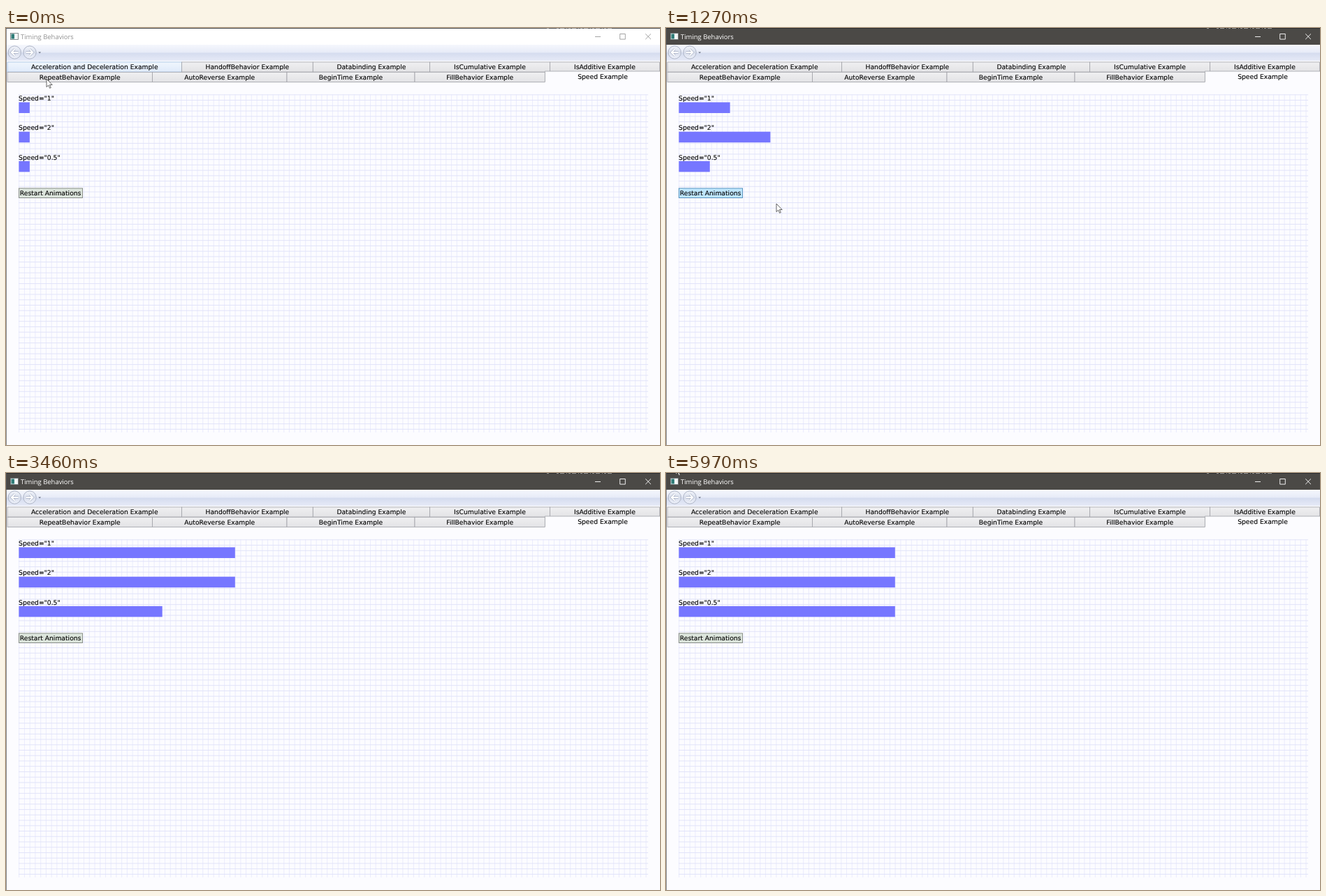
These frames come from a looping animation (936 px wide and 598 px high, 6.17 s). An HTML page:

```html
<!DOCTYPE html>
<html lang="en">
<head>
<meta charset="utf-8">
<title>Timing Behaviors</title>
<style>
html, body { margin: 0; width: 100%; height: 100%; overflow: hidden; background: #fcfcff; }
svg { display: block; width: 936px; height: 598px; }
text { font: 9.2px "DejaVu Sans", sans-serif; fill: #000; stroke: #000; stroke-width: .12px; text-rendering: geometricPrecision; }
#title text { font: 9.45px "Open Sans", sans-serif; stroke: none; }
.mid { text-anchor: middle; }
</style>
</head>
<body>
<svg id="stage" viewBox="0 0 936 598" xmlns="http://www.w3.org/2000/svg">
  <defs>
    <linearGradient id="bar" x1="0" y1="0" x2="0" y2="1">
      <stop offset="0" stop-color="#f5f7fd"/>
      <stop offset=".48" stop-color="#e7ebf7"/>
      <stop offset=".52" stop-color="#d5dcef"/>
      <stop offset="1" stop-color="#e6eaf7"/>
    </linearGradient>
    <linearGradient id="tab" x1="0" y1="0" x2="0" y2="1">
      <stop offset="0" stop-color="#f0f0f2"/>
      <stop offset=".5" stop-color="#e9e9eb"/>
      <stop offset="1" stop-color="#e3e3e6"/>
    </linearGradient>
    <linearGradient id="tabHot" x1="0" y1="0" x2="0" y2="1">
      <stop offset="0" stop-color="#f0f6fd"/>
      <stop offset="1" stop-color="#dfeafa"/>
    </linearGradient>
    <linearGradient id="disc" x1="0" y1="0" x2="0" y2="1">
      <stop offset="0" stop-color="#f3f5fb"/>
      <stop offset=".5" stop-color="#d8deec"/>
      <stop offset="1" stop-color="#eef1fa"/>
    </linearGradient>
  </defs>
  <rect width="936" height="598" fill="#fcfcff"/>
  <g id="title">
    <rect id="caption" width="936" height="24"/>
    <rect x="6.5" y="7.5" width="11" height="9" fill="#f4f6f6" stroke="#6d7778" stroke-width=".8"/>
    <rect x="7.5" y="8.5" width="4.5" height="7" fill="#2f7d78"/>
    <text id="name" x="21" y="15.6">Timing Behaviors</text>
    <path id="controls" fill="none" stroke-width=".9" d="M843 12.5h8M878.7 8.5h7.6v7.6h-7.6zM915.2 8.4l7.8 7.8M923 8.4l-7.8 7.8"/>
  </g>
  <rect y="24" width="936" height="23" fill="url(#bar)"/>
  <g id="nav"></g>
  <path d="M46.3 34.6h3.8l-1.9 1.6z" fill="#5c6474"/>
  <g id="tabs"></g>
  <path id="columns" fill="none" stroke="#e6e7fb" stroke-width=".8"/>
  <path id="lines" fill="none" stroke="#dfe1f9" stroke-width=".9"/>
  <g id="rows"></g>
  <rect id="button" x="18.4" y="229.9" width="91.2" height="13.6" stroke-width=".8"/>
  <text x="19.8" y="240.3">Restart Animations</text>
  <path d="M0 .4H936" stroke="#24262a" stroke-width=".9"/>
  <path d="M774 .5h3M788 .5H868" stroke="#a9a9a9" stroke-width=".8" stroke-dasharray="3 2 6 3 1 2"/>
  <path d="M.4 0V598" stroke="#55575c" stroke-width=".8"/>
  <path id="cursor" d="M0 0V11.6L2.7 9.1L4.6 13.3L6.3 12.5L4.5 8.5H8.2Z" fill="#fff" stroke="#333" stroke-width=".75"/>
</svg>
<script>
const LOOP = 6170, START = 877;
const UNIT = 936 / 1210; // the window is drawn at this scale
const SVG = "http://www.w3.org/2000/svg";
const $ = id => document.getElementById(id);

function set(node, attrs) {
  for (const key in attrs) node.setAttribute(key, attrs[key]);
}
function add(parent, tag, attrs, label) {
  const node = document.createElementNS(SVG, tag);
  set(node, attrs);
  if (label) node.textContent = label;
  return parent.appendChild(node);
}

// Back and forward buttons
const arrow = "M5.4 0H-4M.2 -4.6L-4.4 0L.2 4.6";
for (const [x, dir] of [[12.3, 1], [34, -1]]) {
  const g = add($("nav"), "g", { transform: `translate(${x} 35) scale(${dir} 1)` });
  add(g, "circle", { r: 9.2, fill: "url(#disc)", stroke: "#adb4c6", "stroke-width": 1 });
  add(g, "path", { d: arrow, fill: "none", stroke: "#abb3c6", "stroke-width": 3.3 });
  add(g, "path", { d: arrow, fill: "none", stroke: "#fff", "stroke-width": 2 });
}

// Tabs: each row lists its edges
const plainTab = { fill: "url(#tab)", stroke: "#a0a1a7" };
function tabRow(y, edges, names) {
  return names.map((name, i) => {
    const x = edges[i], width = edges[i + 1] - x;
    const box = add($("tabs"), "rect", { x, y, width, height: 14.2, "stroke-width": 0.8, ...plainTab });
    add($("tabs"), "text", { x: x + width / 2, y: y + 10.4, class: "mid" }, name + " Example");
    return box;
  });
}
const hotTab = tabRow(48.9, [2, 251.5, 439.3, 606.5, 778.4, 935.4],
  ["Acceleration and Deceleration", "HandoffBehavior", "Databinding", "IsCumulative", "IsAdditive"])[0];
tabRow(63.3, [2, 209.5, 402, 585, 771.4],
  ["RepeatBehavior", "AutoReverse", "BeginTime", "FillBehavior"]);
add($("tabs"), "path", { d: "M771.4 79V62H936V79Z", fill: "#fcfcff" });
add($("tabs"), "path", { d: "M771.4 77.5V62H936", fill: "none", stroke: plainTab.stroke, "stroke-width": 0.8 });
add($("tabs"), "text", { x: 854, y: 72.8, class: "mid" }, "Speed Example");

// Background grid
const pitch = 10 * UNIT;
let across = "", down = "";
for (let y = 95.8; y < 580; y += pitch) across += `M18 ${y}H919`;
for (let x = 18.7; x < 919; x += pitch) down += `M${x} 95.4V580`;
set($("lines"), { d: across });
set($("columns"), { d: down });

const bars = [1, 2, 0.5].map((speed, i) => {
  const y = 106.5 + i * 42.2;
  add($("rows"), "text", { x: 18.1, y: y - 2.3 }, `Speed="${speed}"`);
  return { speed, node: add($("rows"), "rect", { x: 18.4, y, height: 20 * UNIT, fill: "#7676ff" }) };
});

// Moments at which the screen refreshes
const ticks = [0, 110, 300, 490, 680, 880, 1080, 1270, 1460, 1660, 1860, 2080, 2280,
  2470, 2670, 2870, 3070, 3270, 3460, 3660, 3850, 4050, 4240, 4430, 4630, 4830, 5020, 5800, 5970];

// Pointer stops: time, x, y
const trips = [
  [[0, 58, 73], [300, 58, 180], [490, 58.5, 226], [680, 58.5, 233], [880, 58.5, 233],
    [1080, 90, 241], [1270, 158, 252], [1460, 882, 60]],
  [[5800, 689, 44], [5970, 14, -9.5]]
];

function pointer(t) {
  for (const trip of trips) {
    const last = trip[trip.length - 1];
    if (t < trip[0][0] || t > last[0]) continue;
    const i = trip.findIndex(p => p[0] >= t);
    const b = trip[i], a = trip[Math.max(0, i - 1)];
    const k = b === a ? 0 : (t - a[0]) / (b[0] - a[0]);
    return [a[1] + (b[1] - a[1]) * k, a[2] + (b[2] - a[2]) * k];
  }
  return null;
}

function draw(time) {
  const now = time % LOOP;
  const t = ticks.filter(tick => tick <= now).pop() || 0;
  const active = t >= 880;
  const hover = t >= 490 && t < 1460;

  for (const { speed, node } of bars) {
    const k = Math.min(1, Math.max(0, (t - START) * speed / 2000));
    set(node, { width: (20 + 380 * k) * UNIT });
  }
  set($("caption"), { fill: active ? "#4b4946" : "#fff" });
  $("name").style.fill = active ? "#fff" : "#929292";
  set($("controls"), { stroke: active ? "#fff" : "#999" });
  set($("button"), hover ? { fill: "#bee6fd", stroke: "#3c7fb1" } : { fill: "#dce5dc", stroke: "#737873" });
  set(hotTab, t < 110 ? { fill: "url(#tabHot)", stroke: "#9fbfe0" } : plainTab);

  const at = pointer(t);
  $("cursor").style.display = at ? "" : "none";
  if (at) set($("cursor"), { transform: `translate(${at[0]} ${at[1]})` });
}

const begun = performance.now();
function loop() {
  draw(performance.now() - begun);
  requestAnimationFrame(loop);
}
loop();
</script>
</body>
</html>
```
